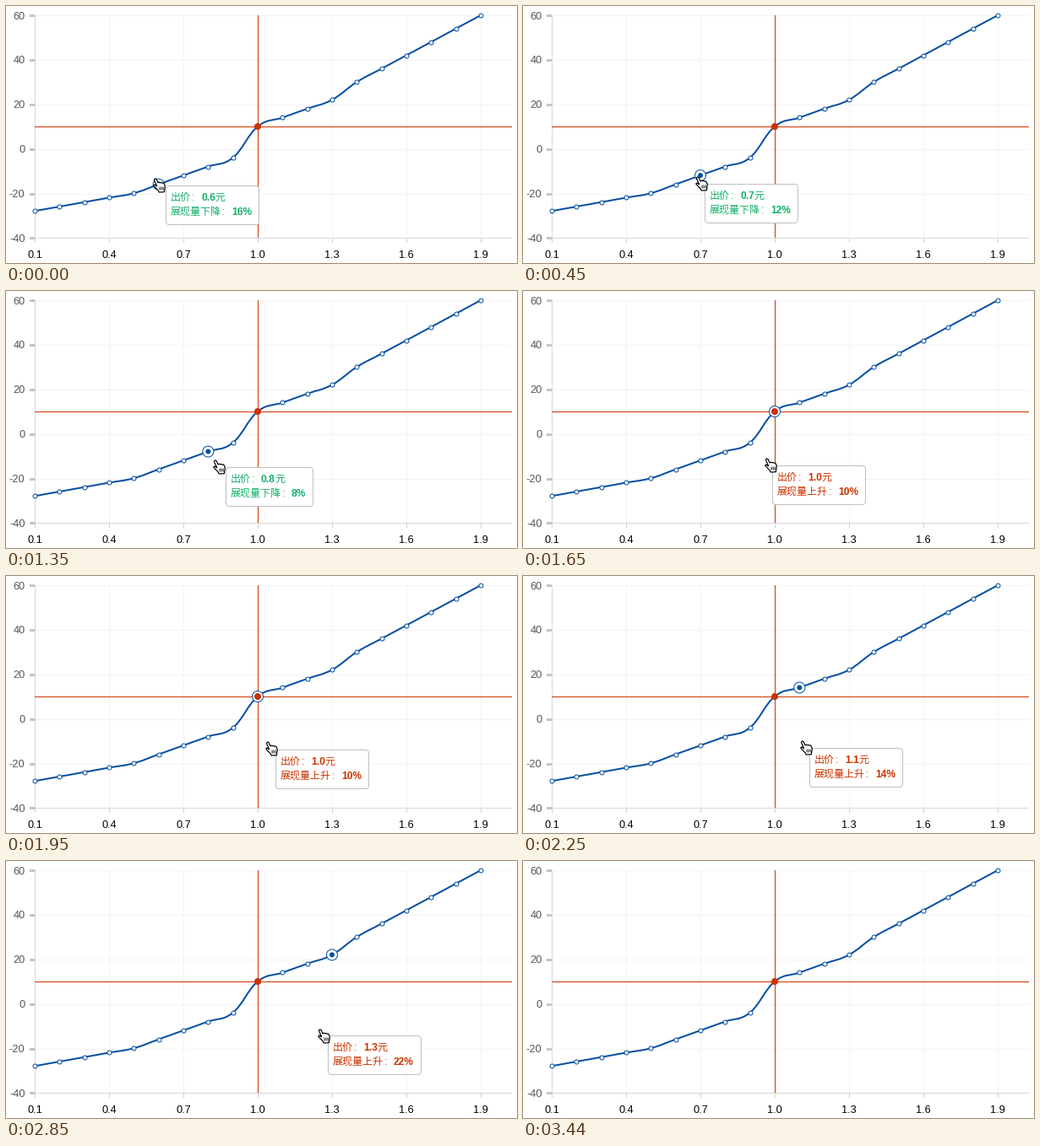
A matplotlib script that plays this animation: 605x305 px, repeating every 4340 ms.

```python
import numpy as np
import matplotlib.pyplot as plt
from matplotlib.animation import FuncAnimation
from matplotlib.patches import Circle, FancyBboxPatch, PathPatch, Polygon
from matplotlib.path import Path

W, H, DPI = 605, 305, 80
PX = 72 / DPI
LOOP, TICK = 4340, 10
BLUE, RED, GREEN = "#034ea2", "#cc3300", "#14b068"
LEFT, RIGHT, TOP, BOTTOM = 34, 599, 11, 275
STEP = 88 / 3
SANS, HAN = "Liberation Sans", "Noto Sans CJK JP"

plt.rcParams["path.snap"] = False
fig = plt.figure(figsize=(W / DPI, H / DPI), dpi=DPI, facecolor="white")
ax = fig.add_axes([0, 0, 1, 1])
ax.set(xlim=(0, W), ylim=(H, 0))
ax.axis("off")


def x_px(i):
    return LEFT + i * 88 / 3


def y_px(value):
    return TOP + (60 - value) * 2.64


def crisp(v):
    """Centre of the pixel that holds a thin line."""
    return np.ceil(v) + 0.5


def h_line(y, x0, x1, color, width=1, z=1):
    ax.plot([x0, x1], [crisp(y)] * 2, color=color, lw=width * PX, zorder=z,
            solid_capstyle="butt")


def v_line(x, y0, y1, color, z=1):
    ax.plot([crisp(x)] * 2, [y0, y1], color=color, lw=PX, zorder=z,
            solid_capstyle="butt")


def label(x, y, text="", size=12, color="black", font=SANS, ha="left", z=3,
          weight="normal"):
    return ax.text(x, y, text, fontsize=size * PX, color=color, family=font,
                   ha=ha, va="baseline", zorder=z, weight=weight)


# Axes and grid
for v in range(-40, 61, 20):
    y = y_px(v)
    h_line(y, LEFT, RIGHT, "#f3f3f3")
    h_line(y, 28, LEFT, "#c4c4c4", 3)
    label(22.5, y + 4.5, str(v), 12.8, "#555555", ha="right")
for i in range(0, 19, 3):
    x = x_px(i)
    v_line(x, TOP, BOTTOM, "#f3f3f3")
    v_line(x, BOTTOM, BOTTOM + 6, "#d0d0d0")
    label(x, 299, f"{(i + 1) / 10:.1f}", 12.8, ha="center")
v_line(LEFT, TOP, BOTTOM, "#d8d8d8")
h_line(BOTTOM, LEFT, RIGHT, "#d8d8d8")
h_line(y_px(10), LEFT, RIGHT, RED, z=2)
v_line(x_px(9), TOP, BOTTOM, RED, z=2)

# Smoothed series
values = np.cumsum([-28] + [2] * 4 + [4] * 4 + [14] + [4] * 3 + [8] + [6] * 5)
xs, ys = x_px(np.arange(19)), y_px(values)
reach = np.zeros(19)
reach[1:-1] = (ys[2:] - ys[:-2]) / 5
span = np.full(19, STEP / 2.5)
span[[0, -1]] = 0
verts = [(xs[0], ys[0])]
for i in range(18):
    verts += [(xs[i] + span[i], ys[i] + reach[i]),
              (xs[i + 1] - span[i + 1], ys[i + 1] - reach[i + 1]),
              (xs[i + 1], ys[i + 1])]
curve = Path(verts, [Path.MOVETO] + [Path.CURVE4] * 54)
ax.add_patch(PathPatch(curve, fc="none", ec=BLUE, lw=2 * PX, zorder=3))
ax.plot(xs, ys, "o", ms=5 * PX, mfc="white", mec=BLUE, mew=PX, zorder=4)
ax.add_patch(Circle((xs[9], ys[9]), 4, fc=RED, lw=0, zorder=5))

# Hover marker
ring = ax.add_patch(Circle((0, 0), 6.5, fc="white", ec=BLUE, lw=PX, zorder=6))
dot = ax.add_patch(Circle((0, 0), 3, lw=0, zorder=7))

# Tooltip
box = ax.add_patch(FancyBboxPatch(
    (0, 0), 110, 46, boxstyle="round,pad=0,rounding_size=4",
    fc="white", ec="#c0c0c0", lw=PX, zorder=8))


def piece(dx, dy, text="", font=SANS, weight="normal"):
    return dx, dy, label(0, 0, text, font=font, z=9, weight=weight)


bid = piece(42, 18, weight="bold")
share = piece(78, 35, weight="bold")
trend = piece(6, 35, font=HAN)
pieces = [bid, share, trend, piece(6, 18, "出价", HAN), piece(30.5, 18, ":"),
          piece(66.5, 35, ":"), piece(58.7, 18, "元", HAN)]

# Hand cursor
HAND = np.array([
    (1.4, 2.2), (2.6, 0.9), (4.1, 1.5), (6, 5.8), (7.2, 5.1), (8.5, 5.8),
    (9.7, 5.3), (10.9, 6.2), (12.2, 5.9), (13.5, 7.3), (14.3, 10),
    (13.4, 16.7), (7.2, 17), (6, 14.6), (2.6, 11.2), (0.8, 9.1),
    (1.4, 8.1), (3, 8.4), (4.6, 9.8)])
hand = ax.add_patch(Polygon(HAND, fc="white", ec="black", lw=1.2 * PX,
                            joinstyle="round", zorder=10))
fingers = [ax.plot([], [], color="black", lw=0.9 * PX, zorder=11)[0]
           for _ in range(3)]

# Pointer path: time, x, y
KEYS = np.array([
    (0, 174, 204), (150, 180, 204), (600, 216, 201), (750, 223, 200),
    (900, 243, 200), (1000, 245, 200), (1350, 245, 200), (1650, 286, 198),
    (2250, 327.5, 195), (2550, 348, 195), (2850, 369, 199),
    (3095, 369, 199), (3140, 369, 204), (3245, 379, 240)])
MOVES = [*range(0, 3000, 150), 3140, 3290]
LEAVE = 3440
TIP_LAG = 45
overlay = [ring, dot, box, hand, *fingers] + [p[2] for p in pieces]


def pointer(t):
    return [round(float(np.interp(t, KEYS[:, 0], KEYS[:, k]))) for k in (1, 2)]


def update(n):
    t = n * TICK
    for artist in overlay:
        artist.set_visible(t < LEAVE)
    if t >= LEAVE:
        return overlay

    moved = max(m for m in MOVES if m <= t)
    cx, cy = pointer(moved)
    tx, ty = np.add(pointer(moved - TIP_LAG), (15, 9))
    i = round((cx + 3 - LEFT) / STEP)
    value = int(values[i])
    current = value == 10

    ring.center = dot.center = xs[i], ys[i]
    dot.set_radius(4 if current else 3)
    dot.set_facecolor(RED if current else BLUE)

    box.set_bounds(tx + 0.5, ty + 0.5, 110 if abs(value) > 9 else 103, 46)
    bid[2].set_text(f"{(i + 1) / 10:.1f}")
    share[2].set_text(f"{abs(value)}%")
    trend[2].set_text("展现量上升" if value > 0 else "展现量下降")
    for dx, dy, text in pieces:
        text.set_position((tx + dx, ty + dy))
        text.set_color(RED if value > 0 else GREEN)

    hand.set_xy(HAND + (cx, cy))
    for k, finger in enumerate(fingers):
        x = cx + 8 + 2 * k
        finger.set_data([x, x + 0.2], [cy + 11, cy + 14])
    return overlay


anim = FuncAnimation(fig, update, frames=LOOP // TICK, interval=TICK,
                     repeat=True, repeat_delay=0)
plt.show()
```
